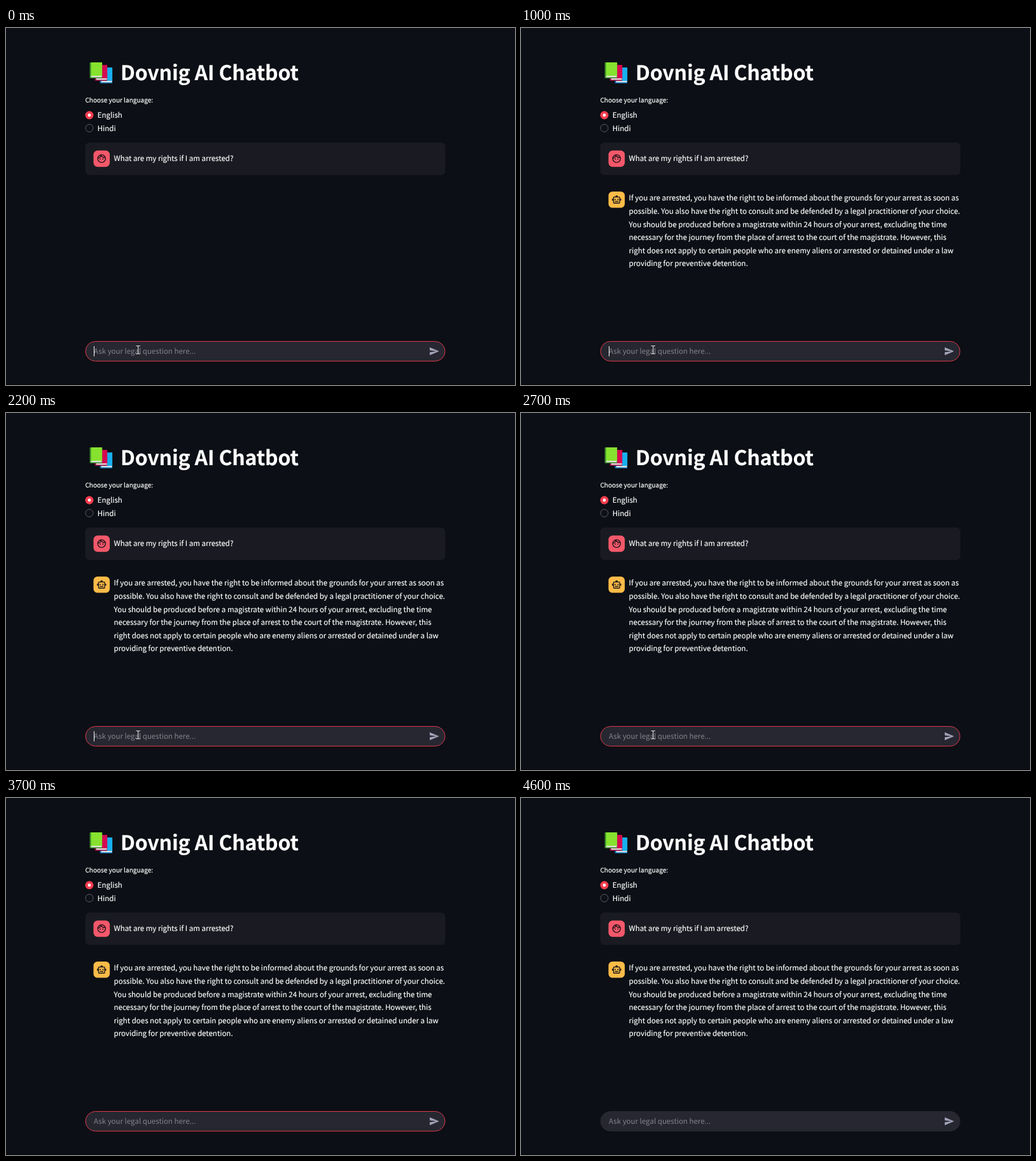
Animation of 800 by 561 pixels, one loop 4.7 s. Source, as an HTML page:

```html
<!DOCTYPE html>
<html lang="en">
<head>
<meta charset="utf-8">
<title>Legal chatbot</title>
<style>
  html, body { margin: 0; width: 100%; height: 100%; overflow: hidden; background: #0c0f15; }
  svg { display: block; width: 800px; height: 561px; }
  text {
    font-family: "Noto Sans CJK JP", "Noto Sans CJK SC", "Noto Sans CJK KR", "Noto Sans", sans-serif;
    font-size: 11.52px;
    fill: #fff;
    stroke: #fff;
    stroke-width: .16px;
    text-rendering: geometricPrecision;
  }
  .title { font-size: 32px; font-weight: 700; letter-spacing: -0.005em; }
  .label { font-size: 10.06px; }
  .hint { fill: #82838c; stroke: none; }
</style>
</head>
<body>
<svg viewBox="0 0 800 561">
  <rect width="800" height="561" fill="#0c0f15"/>
  <rect y="560" width="800" height="1" fill="#040506"/>

  <g id="books"></g>
  <text class="title" x="180" y="82">Dovnig AI Chatbot</text>

  <text class="label" x="124.4" y="116.8">Choose your language:</text>
  <circle cx="131" cy="137" r="6.5" fill="#f43c4e"/>
  <circle cx="131" cy="137" r="2.4" fill="#fff"/>
  <text x="143.7" y="141.2">English</text>
  <circle cx="131" cy="157.3" r="6" fill="#0e1117" stroke="#5b5d66"/>
  <text x="143.7" y="161.6">Hindi</text>

  <rect x="124.5" y="180" width="566" height="51" rx="6.5" fill="#1a1b22"/>
  <rect x="137.5" y="192.6" width="25.6" height="25.6" rx="6.4" fill="#f4586a"/>
  <g transform="translate(142.1 197.1) scale(.68)" fill="none" stroke="#20131a" stroke-width="2">
    <circle cx="12" cy="12" r="9"/>
    <path d="M3.5 11.5C7 10.5 9.4 8.5 10.4 4.8C12.5 8.5 16 10 20.5 9.2"/>
    <g fill="#20131a" stroke="none">
      <circle cx="9" cy="13" r="1.35"/>
      <circle cx="15" cy="13" r="1.35"/>
    </g>
  </g>
  <text x="169.6" y="209.4">What are my rights if I am arrested?</text>

  <g id="answer">
    <rect x="137.5" y="257" width="25.6" height="25.6" rx="6.4" fill="#fdbb48"/>
    <g transform="translate(142.1 261.6) scale(.68)" fill="#1d1a18">
      <rect x="5" y="6" width="14" height="14" rx="1" fill="none" stroke="#1d1a18" stroke-width="2"/>
      <path d="M9 5a3 3 0 0 1 6 0zM4 9a3 3 0 0 0 0 6zM20 9a3 3 0 0 1 0 6zM8 15h8v2H8z"/>
      <circle cx="9" cy="11.5" r="1.5"/>
      <circle cx="15" cy="11.5" r="1.5"/>
    </g>
  </g>

  <rect id="field" x="125" y="492.5" width="565" height="31" rx="15.5" fill="#262730"/>
  <text class="hint" x="138" y="512.3">Ask your legal question here...</text>
  <path d="M2 21l21-9L2 3v7l15 2-15 2z" transform="translate(664.6 499.6) scale(.7)" fill="#a2a3b8"/>
  <rect id="caret" x="138" y="500" width="1" height="16" fill="#fafafa"/>

  <path id="beam" d="M204.5 499.5h2.2l1 .8l1-.8h2.2M204.5 512h2.2l1-.8l1 .8h2.2M207.7 500v11.5"
        fill="none" stroke="#e4e4e6" stroke-width="1.1"/>
  <path id="arrow" d="M0 0v12l2.8-2.6l1.9 4.2l1.8-.8l-1.9-4.1h3.8z"
        fill="#fff" stroke="#111" stroke-width=".7"/>
</svg>
<script>
  const LOOP = 4700;
  const STEP = 100;
  const ANSWER_AT = 900;
  const LEAVE_AT = 3200;
  const GONE_AT = 3500;
  const BLUR_AT = 4400;

  const $ = id => document.getElementById(id);
  const show = (id, on) => $(id).setAttribute("visibility", on ? "visible" : "hidden");

  const lines = [
    "If you are arrested, you have the right to be informed about the grounds for your arrest as soon as",
    "possible. You also have the right to consult and be defended by a legal practitioner of your choice.",
    "You should be produced before a magistrate within 24 hours of your arrest, excluding the time",
    "necessary for the journey from the place of arrest to the court of the magistrate. However, this",
    "right does not apply to certain people who are enemy aliens or arrested or detained under a law",
    "providing for preventive detention."
  ];
  $("answer").innerHTML += lines.map((line, i) =>
    `<text x="169.6" y="${271.4 + i * 20.57}">${line}</text>`).join("");

  const book = (x, y, cover, spine) => `<g transform="translate(${x} ${y})">
    <rect width="19.5" height="25" rx="1" fill="${spine}"/>
    <rect x="2" y="21" width="17" height="2.4" fill="#e6e6e6"/>
    <rect x="2" width="17.5" height="21.2" fill="${cover}"/></g>`;
  $("books").innerHTML =
    book(147.6, 62, "#18aeee", "#0a72b4") +
    book(139.6, 58, "#d50a50", "#960a3c") +
    book(131.6, 54, "#86e22e", "#398c2c");

  function draw(t) {
    const focused = t < BLUR_AT;
    const moving = t >= LEAVE_AT && t < GONE_AT;
    const travel = (t - LEAVE_AT) / (GONE_AT - STEP - LEAVE_AT);

    show("answer", t >= ANSWER_AT);
    show("caret", focused && (t + 100) % 1000 < 500);
    show("beam", t < LEAVE_AT);
    show("arrow", moving);
    if (moving) $("arrow").setAttribute("transform", `translate(207 ${440 - 400 * travel})`);
    $("field").setAttribute("stroke", focused ? "#dc384b" : "#262730");
  }

  const start = performance.now();
  function tick(now) {
    const t = Math.max(0, now - start) % LOOP;
    draw(Math.floor(t / STEP) * STEP);
    requestAnimationFrame(tick);
  }
  draw(0);
  requestAnimationFrame(tick);
</script>
</body>
</html>
```
